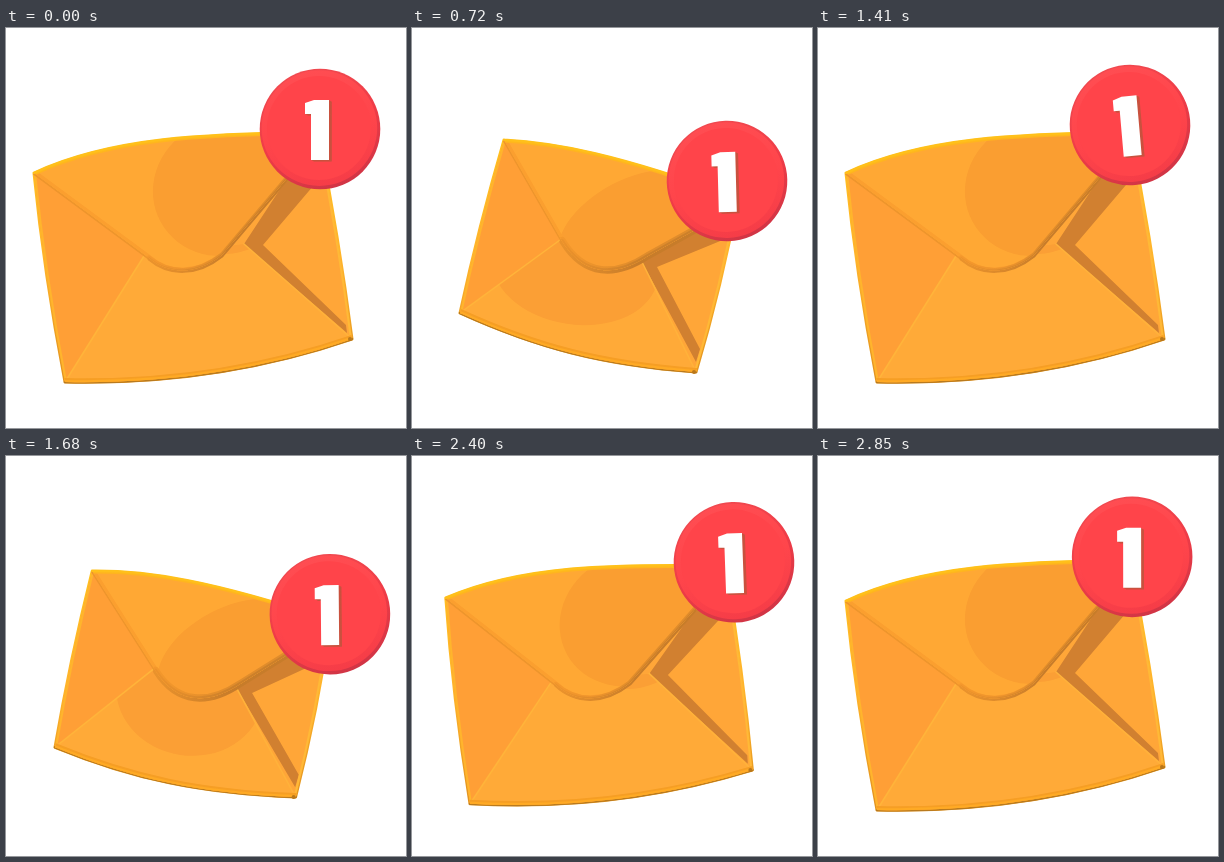
An HTML page with a canvas that plays this animation: 400x400 px, repeating every 2880 ms.

```html
<!DOCTYPE html>
<html lang="en">
<head>
<meta charset="utf-8">
<title>New mail</title>
<style>
html, body { margin: 0; height: 100%; overflow: hidden; background: #fff; }
canvas { display: block; width: 100vmin; height: 100vmin; }
</style>
</head>
<body>
<canvas id="stage" width="400" height="400"></canvas>
<script>
const ctx = document.getElementById('stage').getContext('2d');
const LOOP = 2880, SWING = 720, STEP = 30;

// Each point: x, y when tilted left, then x, y when tilted right.
const P = {
  tl: [28, 145, 92, 112], topA: [105, 109, 145, 115], topB: [200, 106, 205, 126],
  tr: [312, 104, 326, 170], br: [346, 311, 284, 344], bl: [59, 354, 48, 285],
  rightC: [333, 210, 310, 257], leftC: [38, 245, 67, 198],
  botA: [150, 356, 125, 320], botB: [250, 344, 190, 337],
  foldL: [138, 228, 148, 212], foldR: [238, 216, 230, 234],
  flapL: [143, 230, 150, 213], tipA: [163, 247, 172, 249],
  tipB: [191, 247, 204, 249], flapR: [216, 227, 236, 228], flapTop: [282, 149, 292, 197],
  shadeTop: [308, 157, 318, 209], notch: [257, 217, 245, 239],
  shadeEnd: [340, 297, 288, 321], shadeTip: [341, 305, 284, 334]
};

// Badge float on top of the swing: time, dx, dy, degrees
const FLOAT = [
  [0, 0, 0, 0], [240, -5, -2, 0], [720, -5.5, -6.5, -1.5], [1200, -3, -5, -4],
  [1410, -2, -4, -5], [1680, 4, 4, -0.5], [2130, 5.5, 6.5, 2.5], [2400, 7.4, 0, -2],
  [2700, 2, -2, -1], [2880, 0, 0, 0]
];

const mix = (a, b, k) => a + (b - a) * k;
const smooth = x => { x = Math.min(1, Math.max(0, x)); return x * x * (3 - 2 * x); };

function swing(t) {
  const u = t % SWING;
  const e = 0.87 * smooth(u / 190) + 0.13 * smooth(u / 660);
  return t % (2 * SWING) < SWING ? e : 1 - e;
}

function float(t) {
  const i = FLOAT.findIndex(k => k[0] > t);
  const a = FLOAT[i - 1], b = FLOAT[i];
  const k = smooth((t - a[0]) / (b[0] - a[0]));
  return a.map((v, j) => mix(v, b[j], k)).slice(1);
}

function linear(x0, y0, x1, y1, ...colors) {
  const g = ctx.createLinearGradient(x0, y0, x1, y1);
  colors.forEach((c, i) => g.addColorStop(i / (colors.length - 1), c));
  return g;
}

function stroke(path, color, width) {
  ctx.strokeStyle = color;
  ctx.lineWidth = width;
  ctx.stroke(path);
}

function clipped(path, draw) {
  ctx.save();
  ctx.clip(path);
  draw();
  ctx.restore();
}

function ellipse(x, y, rx, ry, angle, color) {
  ctx.fillStyle = color;
  ctx.beginPath();
  ctx.ellipse(x, y, rx, ry, angle, 0, 7);
  ctx.fill();
}

function envelope(p, dx, dy) {
  const at = name => {
    const [ax, ay, bx, by] = P[name];
    return [mix(ax, bx, p), mix(ay, by, p)];
  };
  // "a b c" draws straight lines; a part such as "c1,c2,end" draws a curve.
  const shape = spec => {
    const path = new Path2D();
    spec.split(' ').forEach((part, i) => {
      const pts = part.split(',').flatMap(at);
      if (!i) path.moveTo(...pts);
      else if (pts.length === 2) path.lineTo(...pts);
      else if (pts.length === 4) path.quadraticCurveTo(...pts);
      else path.bezierCurveTo(...pts);
    });
    return path;
  };

  const body = shape('tl topA,topB,tr rightC,br botB,botA,bl leftC,tl');
  const front = shape('bl foldL foldR br botB,botA,bl');
  const flap = shape('tl topA,topB,tr flapTop flapR tipB,tipA,flapL tl');
  const flapEdge = shape('tl flapL tipA,tipB,flapR flapTop');
  const underside = shape('flapL tipA,tipB,flapR flapTop');
  const topEdge = shape('tl topA,topB,tr');
  const bottomEdge = shape('bl botA,botB,br');

  ctx.lineJoin = ctx.lineCap = 'round';
  stroke(body, linear(0, 105, 0, 355, '#ffc21c', '#ffb52a', '#e0921f'), 3);
  stroke(bottomEdge, '#b97a1e', 2.5);
  ctx.fillStyle = '#ffa638';
  ctx.fill(body);

  clipped(body, () => {
    ctx.fillStyle = '#ff9f36';
    ctx.fill(shape('tl foldL bl leftC,tl'));
    ctx.fillStyle = '#ffaa38';
    ctx.fill(front);
    clipped(front, () => ellipse(
      mix(217, 173 + 1.8 * dx, p), mix(160, 242 + 0.4 * dy, p),
      mix(68, 78 - dx, p), mix(66, 61 + 0.6 * dy, p), 0.15, '#fb9f35'));
    ctx.fillStyle = '#d18030';
    ctx.fill(shape('flapTop shadeTop notch shadeEnd shadeTip foldR'));
    stroke(shape('bl foldL'), '#ffb43a', 1.5);
    stroke(shape('foldR br'), '#ffb23a', 1.5);
    stroke(shape('bl leftC,tl'), '#ffb52c', 4);
    stroke(shape('br rightC,tr'), '#ffb936', 4);
    stroke(bottomEdge, '#f69e24', 8);
    stroke(bottomEdge, '#ffaa24', 4);
  });

  ctx.save();
  ctx.translate(0, 1);
  stroke(flapEdge, '#ee952c', 2);
  stroke(underside, linear(150, 0, 225, 0, '#e9922c', '#c77c2a'), mix(3, 5, p));
  ctx.restore();
  ctx.fillStyle = '#ffa834';
  ctx.fill(flap);
  clipped(flap, () => {
    ellipse(mix(217, 225 + 0.6 * dx, p), mix(160, 201 + 0.6 * dy, p),
      mix(71, 82, p), mix(67, 46, p), mix(-0.5, -0.48, p), '#fa9e31');
    stroke(flapEdge, '#fb9f2f', 6);
    stroke(underside, linear(150, 0, 225, 0, '#f4982c', '#e08c2b'), mix(5, 8, p));
    stroke(underside, linear(150, 0, 225, 0, '#ec922b', '#cc802a'), mix(2, 4, p));
    stroke(topEdge, '#ffb51e', 5);
  });
  stroke(topEdge, '#ffc01a', 2);

  const [bx, by] = at('br');
  ellipse(bx - 2, by, 2, 2, 0, '#b9771b');
}

function badge(x, y, degrees) {
  ctx.save();
  ctx.translate(x, y);
  ctx.rotate(degrees * Math.PI / 180);
  ellipse(0, 0, 60.3, 60.3, 0, linear(-25, -60, 25, 60, '#f04a50', '#ef3c47', '#cf3445'));
  ellipse(-0.6, -0.9, 57.8, 57.8, 0, linear(-15, -58, 15, 58, '#ff4d52', '#ff454b', '#f53c47'));
  ellipse(-1, -1, 52, 52, 0, '#ff444a');

  const one = new Path2D('M-15-26L-6-29H9V31H-9V-15H-15Z');
  for (let i = 4; i >= 0; i--) {
    ctx.save();
    ctx.translate(i * 0.7, i * 0.4);
    ctx.fillStyle = i ? '#c9523f' : '#fff';
    ctx.fill(one);
    ctx.restore();
  }
  ctx.restore();
}

function frame(now) {
  const t = Math.floor((now % LOOP) / STEP) * STEP;
  const p = swing(t);
  const [dx, dy, turn] = float(t);
  ctx.fillStyle = '#fff';
  ctx.fillRect(0, 0, 400, 400);
  envelope(p, dx, dy);
  badge(mix(314, 320.5, p) + dx, mix(101, 159.5, p) + dy, turn);
}

const start = performance.now();
function tick() {
  frame(performance.now() - start);
  requestAnimationFrame(tick);
}
tick();
</script>
</body>
</html>
```
